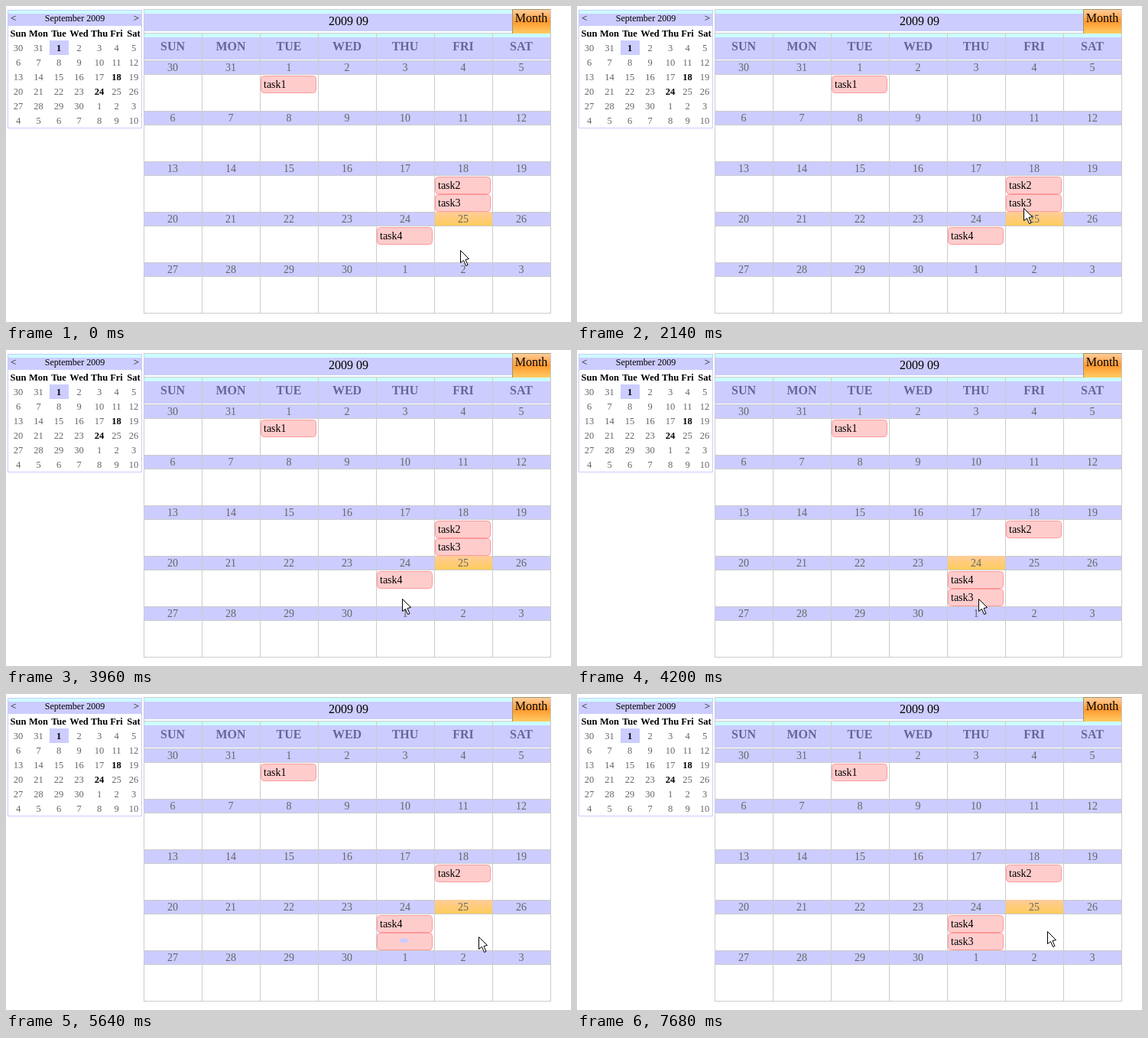
Write an HTML page with a canvas that moves like this. It is 739 by 413 pixels and loops after 8 s.

```html
<!DOCTYPE html>
<html lang="en">
<head>
<meta charset="utf-8">
<title>Month calendar</title>
<style>
html, body { margin: 0; width: 100%; height: 100%; overflow: hidden; background: #fff; }
canvas { display: block; }
</style>
</head>
<body>
<canvas id="stage" width="739" height="413"></canvas>
<script>
const ctx = document.getElementById("stage").getContext("2d");
const LOOP = 8000, TICK = 70;
const SERIF = '"Liberation Serif", "Times New Roman", serif';
const LAVENDER = "#ccccff", CYAN = "#ccffff", LINE = "#cccccc", GREY = "#666666";
const DAYS = ["Sun", "Mon", "Tue", "Wed", "Thu", "Fri", "Sat"];
const LEFT = 180, COL = 76, TOP = 71, ROW = 66;

const HOVER = 2280, DRAG = 3660, LEAVE = 3960, DROP = 4130, SAVE = 5140, SAVED = 7500;

// Where the pointer heads, and when it sets off.
const STOPS = [
  { at: 0, x: 594, y: 319 },
  { at: 970, x: 588, y: 314 },
  { at: 1120, x: 580, y: 297 },
  { at: 1540, x: 579, y: 280 },
  { at: 1970, x: 585, y: 259 },
  { at: HOVER, x: 589, y: 255 },
  { at: 2890, x: 585, y: 258 },
  { at: 3460, x: 577, y: 266 },
  { at: DRAG, x: 518, y: 325 },
  { at: DROP, x: 525, y: 325 },
  { at: 4700, x: 618, y: 317 },
  { at: 7680, x: 615, y: 310 }
];

// Long moves take four ticks, short ones jump.
function pointerAt(time) {
  const last = STOPS.findLastIndex(s => s.at <= time);
  const to = STOPS[last], from = STOPS[Math.max(0, last - 1)];
  const steps = Math.hypot(to.x - from.x, to.y - from.y) < 12 ? 1 : 4;
  const part = Math.min(1, (Math.floor((time - to.at) / TICK) + 1) / steps);
  return { x: from.x + (to.x - from.x) * part, y: from.y + (to.y - from.y) * part };
}

function box(x, y, w, h, color) {
  ctx.fillStyle = color;
  ctx.fillRect(x, y, w, h);
}

function outline(x, y, w, h, color) {
  ctx.strokeStyle = color;
  ctx.lineWidth = 1;
  ctx.strokeRect(x + 0.5, y + 0.5, w - 1, h - 1);
}

function text(str, x, y, size, color = "#000", align = "center", weight = "") {
  ctx.font = `${weight} ${size}px ${SERIF}`;
  ctx.textAlign = align;
  ctx.fillStyle = color;
  ctx.fillText(str, x, y);
}

function shade(y, h, ...colors) {
  const g = ctx.createLinearGradient(0, y, 0, y + h);
  colors.forEach((c, i) => g.addColorStop(i / (colors.length - 1), c));
  return g;
}

function bar(x, y, w, h) {
  box(x, y, w, h, LAVENDER);
  box(x, y, w, 5, CYAN);
}

// The sheet starts on 30 August and runs through September into October.
function dateLabel(i) {
  return i < 2 ? 30 + i : i < 32 ? i - 1 : i - 31;
}

function miniCalendar() {
  // The last two columns are narrower.
  const center = i => 16 + 26.5 * i - 4 * Math.max(0, i - 4);
  bar(2, 5, 176, 21);
  outline(2, 5, 176, 155, LAVENDER);
  text("<", 6, 20, 13, "#000", "left");
  text("September 2009", 90, 20, 12);
  text(">", 174, 20, 13, "#000", "right");
  box(57, 45, 25, 19, LAVENDER);
  DAYS.forEach((d, i) => text(d, center(i), 40, 12.5, "#000", "center", "bold"));
  for (let i = 0; i < 42; i++) {
    const marked = [2, 19, 25].includes(i);
    text(dateLabel(i), center(i % 7), 59 + 19 * Math.floor(i / 7), 12.5,
      marked ? "#000" : GREY, "center", marked ? "bold" : "");
  }
}

function monthButton() {
  box(662, 5, 50, 31, shade(5, 31, "#ffcc99", "#ffb266", "#ff9933", "#ffb347", "#ffcc66"));
  box(662, 4, 50, 1, "#999966");
  box(662, 5, 1, 31, "#999966");
  text("Month", 687, 20.5, 16);
}

function dayCell(i, hot) {
  const x = LEFT + 1 + COL * (i % 7), y = TOP + ROW * Math.floor(i / 7);
  box(x, y, 75, 19, LINE);
  box(x, y + 1, 75, 17, LAVENDER);
  if (hot) box(x, y, 75, 18, shade(y, 18, "#ffcc99", "#ffcc5c"));
  text(dateLabel(i), x + 37, y + 14, 14, GREY);
}

function monthGrid(hot) {
  bar(181, 5, 481, 28);
  text("2009 09", 448, 25, 16);
  bar(181, 36, 531, 34);
  for (let i = 0; i < 35; i++) dayCell(i, i === hot);
  DAYS.forEach((d, i) => {
    text(d.toUpperCase(), LEFT + 38 + COL * i, 58, 16, "#666699", "center", "bold");
    if (i) box(LEFT + COL * i, 36, 1, 366, LINE);
  });
  outline(LEFT, 4, 533, 398, LINE);
  box(LEFT, 35, 533, 1, LINE);
  monthButton();
}

function task(label, day, slot = 0) {
  const x = LEFT + 1 + COL * (day % 7);
  const y = TOP + 20 + ROW * Math.floor(day / 7) + 23 * slot;
  ctx.beginPath();
  ctx.roundRect(x + 0.5, y + 0.5, 72, 22, 4);
  ctx.fillStyle = "#ffcccc";
  ctx.fill();
  ctx.strokeStyle = "#ff9999";
  ctx.lineWidth = 1;
  ctx.stroke();
  text(label, x + 4, y + 16, 14, "#000", "left");
}

function closeIcon() {
  box(613, 250, 13, 13, "#d5e4f5");
  ctx.beginPath();
  ctx.moveTo(616, 253);
  ctx.lineTo(623, 260);
  ctx.moveTo(623, 253);
  ctx.lineTo(616, 260);
  ctx.strokeStyle = "#0c2050";
  ctx.lineWidth = 2;
  ctx.stroke();
}

// A ball swings between two walls: long when fast, squashed when it turns.
function loader(elapsed) {
  const phase = Math.floor(elapsed / TICK) * TICK / 2000 * 2 * Math.PI;
  const speed = Math.abs(Math.sin(phase));
  ctx.beginPath();
  ctx.ellipse(521 - 16.5 * Math.cos(phase), 322.3, 4.5 + 1.5 * speed, 6 - 3 * speed, 0, 0, 2 * Math.PI);
  ctx.fillStyle = LAVENDER;
  ctx.fill();
}

function pointer({ x, y }) {
  ctx.save();
  ctx.translate(Math.round(x) + 0.5, Math.round(y) + 0.5);
  ctx.beginPath();
  [[0, 0], [0, 16], [4, 13], [7, 20], [9.5, 19], [6.5, 12], [11, 11]]
    .forEach(([px, py]) => ctx.lineTo(px, py));
  ctx.closePath();
  ctx.fillStyle = "#fff";
  ctx.fill();
  ctx.strokeStyle = "#000";
  ctx.lineWidth = 1;
  ctx.lineJoin = "round";
  ctx.stroke();
  ctx.restore();
}

function draw(time) {
  const hovering = time >= HOVER && time < LEAVE;
  const moved = time >= DROP;
  const loading = time >= SAVE && time < SAVED;
  const hot = hovering ? 19 : moved && time < SAVE ? 25 : 26;

  box(0, 0, 739, 413, "#fff");
  miniCalendar();
  monthGrid(hot);
  task("task1", 2);
  task("task2", 19);
  task("task4", 25);
  task(loading ? "" : "task3", moved ? 25 : 19, 1);
  if (hovering) closeIcon();
  if (loading) loader(time - SAVE);
  pointer(pointerAt(time));
}

const begin = performance.now();
function tick() {
  draw((performance.now() - begin) % LOOP);
  requestAnimationFrame(tick);
}
tick();
</script>
</body>
</html>
```
